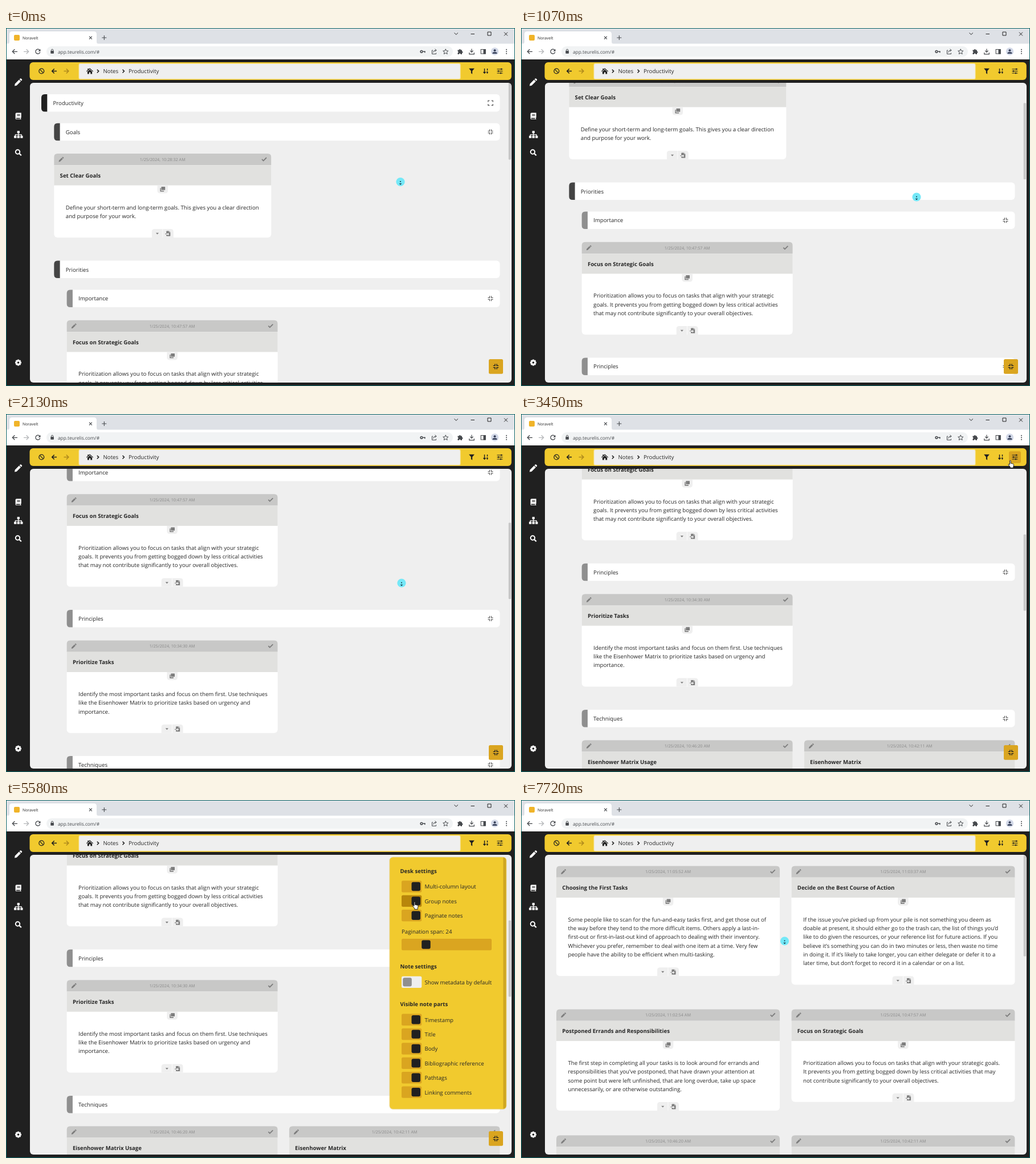
Animation of 893x627 px, one loop 7.99 s. Source, as an HTML page:

```html
<!DOCTYPE html>
<html lang="en">
<head>
<meta charset="utf-8">
<title>Notes</title>
<style>
html, body { margin: 0; width: 100%; height: 100%; overflow: hidden; background: #202020; }
svg { display: block; width: 893px; height: 627px; text-rendering: geometricPrecision; }
text { font-family: "Open Sans", "Noto Sans", sans-serif; font-size: 9.68px; fill: #262626; white-space: pre; }
.bold { font-weight: 700; font-size: 9.6px; }
.stamp { font-size: 7.28px; fill: #8b8b8b; text-anchor: middle; }
</style>
</head>
<body>
<svg id="stage" viewBox="0 0 893 627" xmlns="http://www.w3.org/2000/svg"></svg>
<script>
const NS = 'http://www.w3.org/2000/svg';
const stage = document.getElementById('stage');
const DARK = '#202020', YELLOW = '#f1ca2e', GOLD = '#daa520', PAGE = '#efefef';

function el(parent, tag, attrs = {}) {
  const node = document.createElementNS(NS, tag);
  for (const k in attrs) node.setAttribute(k, attrs[k]);
  return parent.appendChild(node);
}
const group = (p, x = 0, y = 0, s = 1) => el(p, 'g', { transform: `translate(${x} ${y}) scale(${s})` });
const rect = (p, x, y, width, height, fill, rx = 0) => el(p, 'rect', { x, y, width, height, fill, rx });
const disc = (p, cx, cy, r, fill) => el(p, 'circle', { cx, cy, r, fill });
const fillPath = (p, d, fill) => el(p, 'path', { d, fill });
const line = (p, d, stroke, w = 1.2) => el(p, 'path', { d, stroke, fill: 'none', 'stroke-width': w });
function text(p, x, mid, str, cls = '', attrs = {}) {
  const t = el(p, 'text', { x, y: mid + 3.6, class: cls, ...attrs });
  t.textContent = str;
  return t;
}

// Icons are drawn around 0,0 in a box of about 14 units.
const icons = {
  pen: 'M-6.7 6.7l.7-3.8L1.5-4.6l3.1 3.1L-2.9 6zM2.3-5.4L3.6-6.7a1.2 1.2 0 0 1 1.6 0l1.5 1.5a1.2 1.2 0 0 1 0 1.6L5.4-2.3z',
  check: 'M-6.5.4l1.8-1.8 2.7 2.7 6.7-6.7 1.8 1.8-8.5 8.5z',
  caret: 'M-4-2h8L0 2.5z',
  copy: 'M-2.5-6.5h8a1 1 0 0 1 1 1v6.5a1 1 0 0 1-1 1h-8a1 1 0 0 1-1-1v-6.5a1 1 0 0 1 1-1zM-6.5-3.5h2v5.5a1.5 1.5 0 0 0 1.5 1.5h6.5v1.5a1 1 0 0 1-1 1h-8a1 1 0 0 1-1-1z',
  addFile: 'M-4-7h6v4h4v9a1 1 0 0 1-1 1h-9a1 1 0 0 1-1-1v-3h4v2.5l4-4-4-4v2.5h-4v-6a1 1 0 0 1 1-1zM3-7l3 3h-3zM-8 0h3v2h-3z',
  book: 'M-4-7h10v10.5l-1 .5v2h1v1h-10a2.3 2.3 0 0 1-2.3-2.3v-9.4a2.3 2.3 0 0 1 2.3-2.3zM-3-4v1.2h6.5v-1.2zM-3-1.6v1.2h6.5v-1.2zM-4 4a1 1 0 0 0 0 2h7.5v-2z',
  tree: 'M-2.3-7h4.6v4.3h-1.6v2h5.8v2.7h1.8v4.3h-4.6v-4.3h1.4v-1.3h-4.4v1.3h1.6v4.3h-4.6v-4.3h1.6v-1.3h-4.4v1.3h1.4v4.3h-4.6v-4.3h1.8v-2.7h5.8v-2h-1.6z',
  house: 'M0-6.5l7.5 6.7-1 1.1-6.5-5.8-6.5 5.8-1-1.1 3-2.7v-3h2v1.2zM0-3.2l5 4.5v4.7h-3.5v-3.7h-3v3.7H-5v-4.7z',
  funnel: 'M-6.5-6.5h13l-5 6.2v7.3l-3-2.3v-5z'
};
const icon = (p, name, x, y, size, fill) => fillPath(group(p, x, y, size / 14), icons[name], fill);

function corners(p, x, y, inward, color, s = 1) {
  const d = inward
    ? 'M-4.5-1.5h3v-3M4.5-1.5h-3v-3M-4.5 1.5h3v3M4.5 1.5h-3v3'
    : 'M-4.2-1.6v-2.6h2.6M4.2-1.6v-2.6h-2.6M-4.2 1.6v2.6h2.6M4.2 1.6v2.6h-2.6';
  line(group(p, x, y, s), d, color, 1.3);
}

function browser() {
  rect(stage, 0, 0, 893, 627, '#0c6465');
  rect(stage, 1, 1, 891, 625, DARK);
  rect(stage, 1, 1, 891, 28, '#dee1e6');
  fillPath(stage, 'M2 28q4 0 4-4V11q0-5 5-5h143q5 0 5 5v13q0 4 4 4z', '#fff');
  rect(stage, 1, 27.5, 891, 27.5, '#fff');
  rect(stage, 71, 32, 713, 18.5, '#f1f3f4', 9);
  rect(stage, 14, 12, 10, 10, '#f0b429', 2);
  text(stage, 29, 16.3, 'Noravelt', '', { style: 'font-size:6.9px' });
  text(stage, 91, 41, 'app.teurelis.com/#', '', { style: 'font-size:8.3px;fill:#45484c' });

  const ink = '#45484c';
  line(stage, 'M146 14.7l4.8 4.8M150.8 14.7l-4.8 4.8M172.3 13v8M168.3 17h8', ink, 1.1);
  line(stage, 'M786.5 8.5l3.2 3 3.2-3M815.5 10.5h6.5M845 7h6v6h-6zM874 7.5l6 6M880 7.5l-6 6', '#222', 1);
  line(stage, 'M20 41.3h-8.5M15.3 37.3l-4 4 4 4', ink, 1.3);
  line(stage, 'M31 41.3h8.5M35.7 37.3l4 4-4 4', '#b4b6b9', 1.3);
  line(stage, 'M59.3 39a4 4 0 1 0 .5 3.3', ink, 1.3);
  fillPath(stage, 'M60.5 36.7v4h-4z', ink);
  rect(stage, 78.3, 40, 5.6, 4.7, ink, .6);
  line(stage, 'M79.5 40v-1.2a1.6 1.6 0 0 1 3.2 0V40', ink, 1);
  line(stage, 'M731.8 41.3h4M734.8 41.3v2', ink, 1.5);
  el(stage, 'circle', { cx: 729, cy: 41.3, r: 1.9, fill: 'none', stroke: ink, 'stroke-width': 1.5 });
  line(stage, 'M749 39h-1.5v6.5h7v-2M749.5 43q.5-4 4.5-4M752.5 36.8l2.7 2.2-2.7 2.2', ink, 1);
  line(stage, 'M771.3 36.8l1.3 3.1 3.3.2-2.5 2.2.8 3.3-2.9-1.8-2.9 1.8.8-3.3-2.5-2.2 3.3-.2z', ink, 1);
  fillPath(stage, 'M792.5 38.5h2.3a1.5 1.5 0 1 1 3 0h2.2v2.3a1.5 1.5 0 1 1 0 3v2.2h-2.4a1.4 1.4 0 0 0-2.8 0h-2.3v-2.5a1.4 1.4 0 0 0 0-2.7z', ink);
  line(stage, 'M817 36.5v5.5M814.3 39.7l2.7 2.7 2.7-2.7M812.8 43v2.8h8.5V43', ink, 1.2);
  line(stage, 'M833.2 37.5h8v7.5h-8z', ink, 1.1);
  rect(stage, 837.5, 37, 4, 8.5, ink);
  disc(stage, 857.5, 41, 6.7, '#d3d9e8');
  disc(stage, 857.5, 39.2, 2, '#39435c');
  fillPath(stage, 'M853.5 45v-.8q0-2.2 4-2.2t4 2.2v.8z', '#39435c');
  for (const y of [37.8, 41.3, 44.8]) disc(stage, 878, y, 1, ink);
}

function sidebar() {
  icon(stage, 'pen', 21.5, 95, 13.5, '#fff');
  icon(stage, 'book', 21.8, 154.3, 11.5, '#fff');
  icon(stage, 'tree', 21.8, 186.8, 13, '#fff');
  el(stage, 'circle', { cx: 20.5, cy: 217, r: 3.7, fill: 'none', stroke: '#fff', 'stroke-width': 2 });
  line(stage, 'M23.5 220l3.3 3.3', '#fff', 2.3);
  for (let i = 0; i < 4; i++) {
    el(stage, 'rect', { x: 20, y: 580.5, width: 3, height: 11, rx: .6, fill: '#fff', transform: `rotate(${i * 45} 21.5 586)` });
  }
  disc(stage, 21.5, 586, 4.2, '#fff');
  disc(stage, 21.5, 586, 1.8, DARK);
}

let menuHover;
function topBar() {
  rect(stage, 41.5, 60, 845.3, 31, YELLOW, 6);
  rect(stage, 127.5, 62, 670, 27.7, '#f7e6a8', 2.5);
  rect(stage, 128.5, 63, 668, 25.7, PAGE, 2);
  el(stage, 'circle', { cx: 62.3, cy: 75.5, r: 4.4, fill: 'none', stroke: DARK, 'stroke-width': 1.3 });
  line(stage, 'M59.2 72.4l6.2 6.2', DARK, 1.3);
  line(stage, 'M89 75.5h-8M84.7 71.5l-4 4 4 4', DARK, 1.6);
  line(stage, 'M101.5 75.5h8M105.8 71.5l4 4-4 4', '#b08a1c', 1.6);
  icon(stage, 'house', 147, 75.5, 11.5, DARK);
  line(stage, 'M159.8 72.7l2.9 2.9-2.9 2.9M204.5 72.7l2.9 2.9-2.9 2.9', DARK, 1.5);
  text(stage, 170.5, 75.8, 'Notes');
  text(stage, 215, 75.8, 'Productivity');
  menuHover = rect(stage, 856, 65.3, 21, 20.7, GOLD, 3);
  icon(stage, 'funnel', 817, 75.5, 10.5, DARK);
  line(stage, 'M839.5 71v8M837.5 77l2 2.3 2-2.3M844.5 71v3.5M844.5 76.5v3.3', DARK, 1.4);
  el(stage, 'circle', { cx: 844.3, cy: 77.5, r: 1, fill: 'none', stroke: DARK });
  line(stage, 'M861.5 72h10M861.5 75.5h10M861.5 79h10', DARK, 1.2);
  line(stage, 'M869 70.7v2.6M864 74.2v2.6M868 77.7v2.6', DARK, 1.8);
}

const SHADES = ['#202020', '#444', '#8f8f8f'];
function heading(p, level, y, label, mark) {
  const x = 62 + level * 22.3;
  rect(p, x, y, 866.5 - x, 30.5, '#fff', 6);
  fillPath(p, `M${x + 10.3} ${y}v30.5h-4.3q-6 0-6-6v-18.5q0-6 6-6z`, SHADES[level]);
  text(p, x + 20.5, y + 15.3, label);
  if (mark) corners(p, 850, y + 15.3, mark === 'in', '#666');
}

function card(p, x, y, w, time, title, lines) {
  const h = 116.5 + lines.length * 15.25, c = x + w / 2, b = y + h, gray = '#7d7d7d';
  rect(p, x, y, w, h, '#fff', 6);
  fillPath(p, `M${x} ${y + 20.3}v-14.3q0-6 6-6h${w - 12}q6 0 6 6v14.3z`, '#c8c8c7');
  rect(p, x, y + 20.3, w, 35.3, '#e1e1df');
  icon(p, 'pen', x + 12.5, y + 10.2, 9, gray);
  icon(p, 'check', x + w - 12.3, y + 10.2, 10, gray);
  el(p, 'text', { x: c, y: y + 13, class: 'stamp' }).textContent = `1/25/2024, ${time} AM`;
  text(p, x + 10.3, y + 38.3, title, 'bold');
  fillPath(p, `M${c - 9.3} ${y + 55.6}h18.6v9q0 5-5 5h-8.6q-5 0-5-5z`, PAGE);
  icon(p, 'copy', c, y + 62.5, 9.5, gray);
  lines.forEach((s, i) => text(p, x + 20.5, y + 94 + i * 15.25, s));
  fillPath(p, `M${c - 19} ${b}v-10q0-5 5-5h28q5 0 5 5v10z`, PAGE);
  line(p, `M${c} ${b - 15}v15`, '#fff', .8);
  icon(p, 'caret', c - 9.3, b - 7, 9, gray);
  icon(p, 'addFile', c + 9.7, b - 7, 9, gray);
}

function groupedNotes(p) {
  heading(p, 0, 116, 'Productivity', 'out');
  heading(p, 1, 166.8, 'Goals', 'in');
  card(p, 84.3, 220, 381, '10:28:32', 'Set Clear Goals', [
    'Define your short-term and long-term goals. This gives you a clear direction',
    'and purpose for your work.']);
  heading(p, 1, 407.6, 'Priorities');
  heading(p, 2, 458.5, 'Importance', 'in');
  card(p, 106.6, 511.8, 370, '10:47:57', 'Focus on Strategic Goals', [
    'Prioritization allows you to focus on tasks that align with your strategic',
    'goals. It prevents you from getting bogged down by less critical activities',
    'that may not contribute significantly to your overall objectives.']);
  heading(p, 2, 714.5, 'Principles', 'in');
  card(p, 106.6, 767.9, 370, '10:34:30', 'Prioritize Tasks', [
    'Identify the most important tasks and focus on them first. Use techniques',
    'like the Eisenhower Matrix to prioritize tasks based on urgency and',
    'importance.']);
  heading(p, 2, 970.6, 'Techniques', 'in');
  card(p, 106.6, 1024, 370, '10:46:20', 'Eisenhower Matrix Usage', []);
  card(p, 496.8, 1024, 369.7, '10:42:11', 'Eisenhower Matrix', []);
}

function flatNotes(p) {
  const left = 62, right = 474.5, w = 392;
  card(p, left, 118.7, w, '11:05:52', 'Choosing the First Tasks', [
    'Some people like to scan for the fun-and-easy tasks first, and get those out of',
    'the way before they tend to the more difficult items. Others apply a last-in-',
    'first-out or first-in-last-out kind of approach to dealing with their inventory.',
    'Whichever you prefer, remember to deal with one item at a time. Very few',
    'people have the ability to be efficient when multi-tasking.']);
  card(p, right, 118.7, w, '11:03:37', 'Decide on the Best Course of Action', [
    'If the issue you’ve picked up from your pile is not something you deem as',
    'doable at present, it should either go to the trash can, the list of things you’d',
    'like to do given the resources, or your reference list for future actions. If you',
    'believe it’s something you can do in two minutes or less, then waste no time',
    'in doing it. If it’s likely to take longer, you can either delegate or defer it to a',
    'later time, but don’t forget to record it in a calendar or on a list.']);
  card(p, left, 369.8, w, '11:02:54', 'Postponed Errands and Responsibilities', [
    'The first step in completing all your tasks is to look around for errands and',
    'responsibilities that you’ve postponed, that have drawn your attention at',
    'some point but were left unfinished, that are long overdue, take up space',
    'unnecessarily, or are otherwise outstanding.']);
  card(p, right, 369.8, w, '10:47:57', 'Focus on Strategic Goals', [
    'Prioritization allows you to focus on tasks that align with your strategic goals.',
    'It prevents you from getting bogged down by less critical activities that may',
    'not contribute significantly to your overall objectives.']);
  card(p, left, 590.5, w, '10:46:20', 'Eisenhower Matrix Usage', []);
  card(p, right, 590.5, w, '10:42:11', 'Eisenhower Matrix', []);
}

function toggle(p, y, label) {
  const track = rect(p, 694, y - 10.5, 35.3, 20.4, GOLD, 2.5);
  const knob = rect(p, 711.5, y - 8, 15.5, 15.4, DARK, 3);
  text(p, 734.5, y, label);
  return (on, hover) => {
    track.setAttribute('fill', on ? (hover ? '#b8860b' : GOLD) : (hover ? '#d3d3d3' : PAGE));
    knob.setAttribute('fill', on ? DARK : '#8f8f8f');
    knob.setAttribute('x', on ? 711.5 : 696.3);
  };
}

let setGroup;
function settings(p) {
  rect(p, 672.5, 99.7, 205.8, 442.2, '#e2bd3d99', 6.5);
  rect(p, 673.5, 100.5, 203.8, 440.3, YELLOW, 5.5);
  fillPath(p, 'M872.3 100.5q5 .5 5 5.5v429.3q0 5-5 5.5z', '#cfa722');
  text(p, 691.5, 124.3, 'Desk settings', 'bold');
  toggle(p, 151.8, 'Multi-column layout');
  setGroup = toggle(p, 177.2, 'Group notes');
  toggle(p, 202.5, 'Paginate notes');
  text(p, 694, 230.5, 'Pagination span: 24');
  rect(p, 694, 243, 158, 20.3, GOLD, 2.5);
  rect(p, 729.2, 245.4, 15.5, 15.4, DARK, 3);
  text(p, 691.5, 291.5, 'Note settings', 'bold');
  toggle(p, 319.2, 'Show metadata by default')(false);
  text(p, 691.5, 357.3, 'Visible note parts', 'bold');
  ['Timestamp', 'Title', 'Body', 'Bibliographic reference', 'Pathtags', 'Linking comments']
    .forEach((s, i) => toggle(p, 385 + i * 25.38, s));
}

browser();
sidebar();
topBar();
rect(stage, 42, 96, 845, 525, PAGE, 6);
const clip = el(el(stage, 'defs'), 'clipPath', { id: 'desk' });
rect(clip, 42, 96, 845, 525, '#000', 6);
const desk = el(stage, 'g', { 'clip-path': 'url(#desk)' });
const grouped = group(desk), flat = group(desk);
groupedNotes(grouped);
flatNotes(flat);
const thumb = rect(desk, 881.7, 97, 4.5, 133, '#c8c8c8', 1);
const collapse = group(stage);
rect(collapse, 847, 580, 25, 25.8, GOLD, 2.5);
corners(collapse, 859.5, 593, true, DARK, 1.05);
const panel = group(stage);
settings(panel);

const pointers = { pan: group(stage), arrow: group(stage), hand: group(stage), click: group(stage) };
disc(pointers.pan, 0, 0, 7.6, '#74e8f7');
disc(pointers.pan, 0, -.5, 1, '#134');
fillPath(pointers.pan, 'M-2.3 2.8h4.6L0 5.3z', '#134');
disc(pointers.click, 0, 0, 7.7, '#f3ec5c');
for (const k of ['arrow', 'click']) {
  el(pointers[k], 'path', { d: 'M.4.2v9.6l2.2-2 1.5 3.5 1.6-.7-1.5-3.4h3z', fill: '#fff', stroke: '#111', 'stroke-width': .8 });
}
el(pointers.hand, 'path', {
  d: 'M-1 1q0-1 .9-1t.9 1v4l1.8.2 1.7.4 1.2.6q.6.4.5 1.5l-.7 3.3v1.8h-5.6v-1.6l-3-3.7q-.5-1 .4-1.3t1.9 1z',
  fill: '#fff', stroke: '#111', 'stroke-width': .9
});

const LOOP = 7990;
// time, value
const scrollSteps = [[0, 0], [270, 4], [540, 28], [800, 78], [1070, 137], [1330, 195.5], [1610, 254],
  [1860, 313], [2130, 371.5], [2400, 430], [2650, 452.7], [5850, 0], [7720, 3.3]];
// time, kind, x, y
const pointerSteps = [[0, 'pan', 692, 269.5], [270, 'pan', 692.5, 280], [540, 'pan', 693.5, 291], [800, 'pan', 694, 296],
  [2910, 'arrow', 770, 147], [3180, 'arrow', 836, 99], [3450, 'hand', 858.5, 81.5],
  [4520, 'arrow', 838, 104], [4780, 'arrow', 788, 128], [5050, 'arrow', 752, 152],
  [5310, 'hand', 720, 177], [5580, 'hand', 717, 178.5],
  [6380, 'arrow', 499, 218], [6660, 'arrow', 463.5, 223.5], [6920, 'click', 463.5, 223.5],
  [7190, 'arrow', 463.5, 229], [7450, 'pan', 462.5, 247]];

const at = (steps, t) => steps.findLast(s => s[0] <= t);
const between = (t, a, b) => t >= a && t < b;
const show = (node, on) => node.setAttribute('visibility', on ? 'visible' : 'hidden');

function render(t) {
  const y = at(scrollSteps, t)[1], isFlat = t >= 5850;
  grouped.setAttribute('transform', `translate(0 ${-y})`);
  flat.setAttribute('transform', `translate(0 ${-y})`);
  show(grouped, !isFlat);
  show(collapse, !isFlat);
  show(flat, isFlat);
  thumb.setAttribute('y', 97 + y * .252);
  thumb.setAttribute('height', isFlat ? 176 : 133.5);
  show(menuHover, between(t, 3450, 4520));
  show(panel, between(t, 3720, 7190));
  setGroup(!isFlat, between(t, 5310, 6380));
  const [, kind, px, py] = at(pointerSteps, t);
  for (const k in pointers) show(pointers[k], k === kind);
  pointers[kind].setAttribute('transform', `translate(${px} ${py})`);
}

const start = performance.now();
function tick() {
  render((performance.now() - start) % LOOP);
  requestAnimationFrame(tick);
}
render(0);
requestAnimationFrame(tick);
</script>
</body>
</html>
```
